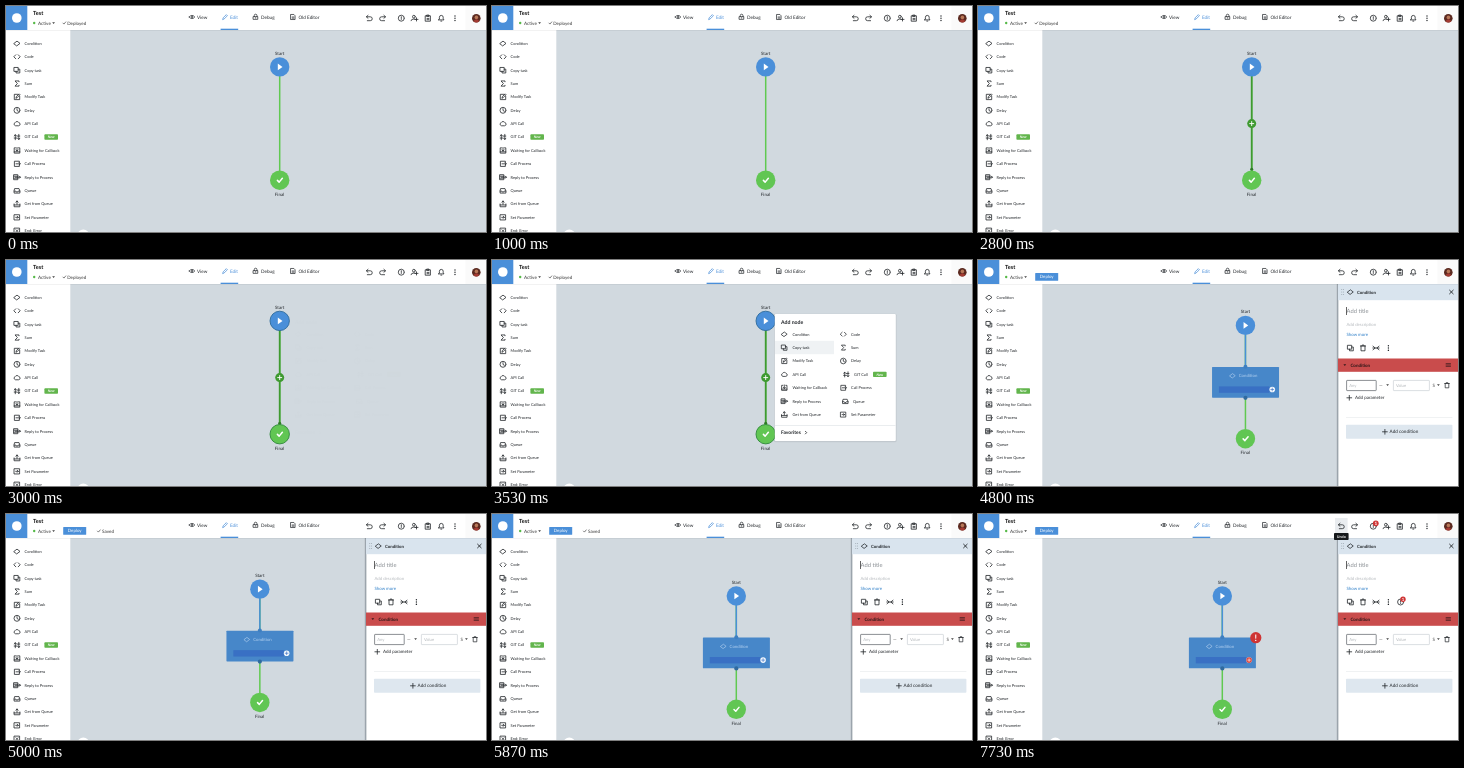
An HTML page for the animation above (8 s loop, 480 by 226 pixels).

```html
<!DOCTYPE html>
<html lang="en">
<head>
<meta charset="utf-8">
<title>Process editor</title>
<style>
html, body { margin: 0; width: 100%; height: 100%; overflow: hidden; background: #d1d9df; }
svg { display: block; width: 100vw; height: 100vh; }
text { font-family: Lato, "Open Sans", sans-serif; fill: #22262a; text-rendering: geometricPrecision; white-space: pre; }
.ic { fill: none; stroke: #22262a; stroke-width: .8; stroke-linejoin: round; stroke-linecap: round; }
</style>
</head>
<body>
<svg id="stage" viewBox="0 0 480 226" xmlns="http://www.w3.org/2000/svg"></svg>
<script>
const LOOP = 8000;
const BLUE = '#4a8fd9', GREEN = '#61c653', DARK = '#3f9a31', RED = '#cf3434';

// 8x8 line icons centred on 0,0
const ICONS = {
  diamond: 'M-3 0L0-2.3L3 0L0 2.3Z',
  code: 'M-1.2-2L-3.2 0L-1.2 2M1.2-2L3.2 0L1.2 2',
  copy: 'M-2.7-2.7H1.2V1.2H-2.7ZM1.2-1H2.8V2.8H-1V1.2',
  sum: 'M2-1.8V-2.6H-2L.4 0L-2 2.6H2V1.8',
  modify: 'M1-2.6H-2.7V2.7H2.7V-.6M-1 1L-.6-.4L2.2-3L3-2.2L.4.5Z',
  clock: 'M3 0A3 3 0 1 1-3 0A3 3 0 1 1 3 0M0-1.7V.2L1.4 1',
  cloud: 'M-1.8 2A1.6 1.6 0 0 1-1.9-1A2.2 2.2 0 0 1 2-.9A1.5 1.5 0 0 1 2 2Z',
  git: 'M-1.7 2.7V-2.2M-2.7-1.2L-1.7-2.4L-.7-1.2M-2.8 1H0M1.8-2.7V2.3M.8 1.2L1.8 2.5L2.8 1.2M0-1H2.8',
  wait: 'M-1.5-2.6H-2.8V2.7H2.8V-2.6H1.5M0-3V.6M-1.1-.5L0 .7L1.1-.5M-2.8 1.4H2.8',
  call: 'M2.4-1V-2.6H-2.6V2.6H2.4V1M-1 0H3.2M2.2-1L3.2 0L2.2 1',
  reply: 'M-3-2.5H.8V2.5H-3ZM-1.6 0H3.4M2.3-1.1L3.4 0L2.3 1.1M-3-1H.8M-3 1H.8',
  queue: 'M-2-2H2L2.9.5V2.5H-2.9V.5ZM-2.9.5H-1.2L-.8 1.4H.8L1.2.5H2.9',
  getq: 'M-2.9 0V2.8H2.9V0M-2.9 1H2.9M0 .4V-3M-1.2-1.8L0-3L1.2-1.8',
  param: 'M-2.6-2.6H2.6V2.6H-2.6ZM-1.3 0H1.3M.3-1L1.3 0L.3 1',
  end: 'M-2.6-2.6H2.6V2.6H-2.6ZM-1-1L1 1M1-1L-1 1',
  eye: 'M-3.1 0Q0-3.8 3.1 0Q0 3.8-3.1 0ZM.8 0A.8.8 0 1 1-.8 0A.8.8 0 1 1 .8 0',
  pencil: 'M-2.5 2.5L-2 .8L1.5-2.6L2.7-1.4L-.8 2Z',
  lock: 'M-2.4-.4H2.4V2.6H-2.4ZM-1.5-.4V-1.6A1.5 1.5 0 0 1 1.5-1.6V-.4M0 .7V1.3',
  page: 'M-2.3-2.8H1L2.3-1.4V2.8H-2.3ZM-1 0H1M-1 1.3H1',
  undo: 'M-1.3-2.9L-2.9-1.4L-1.3.1M-2.8-1.4H1A1.9 1.9 0 0 1 1 2.5H-2',
  redo: 'M1.3-2.9L2.9-1.4L1.3.1M2.8-1.4H-1A1.9 1.9 0 0 0-1 2.5H2',
  info: 'M3 0A3 3 0 1 1-3 0A3 3 0 1 1 3 0M0-1.5V.3M0 1.4V1.5',
  user: 'M1-1.5A1.4 1.4 0 1 1-1.8-1.5A1.4 1.4 0 1 1 1-1.5M-3.3 2.5Q-3.2.8-.4.8Q1 .8 1.2 1.3M2.2-.4V2.8M.7 1.2H3.7',
  board: 'M-2.4-2.4H2.4V3H-2.4ZM-1-3.1H1V-1.8H-1ZM-1 .2H1M-1 1.5H1',
  bell: 'M-2.7 1.7H2.7L1.9.6V-.9A1.9 1.9 0 0 0-1.9-.9V.6ZM-.5 2.9H.5',
  dots: 'M0-2.3V-2.2M0 0V.1M0 2.3V2.4',
  trash: 'M-2.6-2H2.6M-1-2V-2.9H1V-2M-2-2V2.8H2V-2',
  split: 'M-3-1.8L-.8 0L-3 1.8M3-1.8L.8 0L3 1.8M-3.2 0H3.2',
  close: 'M-1.8-1.8L1.8 1.8M1.8-1.8L-1.8 1.8',
  plus: 'M-2.4 0H2.4M0-2.4V2.4',
  check: 'M-1.5.1L-.4 1.2L1.6-1.2',
  menu: 'M-2.2-1.4H2.2M-2.2 0H2.2M-2.2 1.4H2.2'
};

const icon = (name, x, y, color = '#22262a', scale = 1, w = .8) =>
  `<path class="ic" d="${ICONS[name]}" transform="translate(${x} ${y}) scale(${scale})" style="stroke:${color};stroke-width:${w}"/>`;
const label = (s, x, y, size, color = '#22262a', extra = '') =>
  `<text x="${x}" y="${y + size * .35}" font-size="${size}" style="fill:${color}" ${extra}>${s}</text>`;
const rect = (x, y, w, h, fill, extra = '') =>
  `<rect x="${x}" y="${y}" width="${w}" height="${h}" fill="${fill}" ${extra}/>`;
const circle = (x, y, r, fill, extra = '') =>
  `<circle cx="${x}" cy="${y}" r="${r}" fill="${fill}" ${extra}/>`;
const line = (y1, y2, color, w, id) =>
  `<path id="${id}" d="M273.7 ${y1}V${y2}" stroke="${color}" stroke-width="${w}" fill="none"/>`;
const caret = (x, y, color = '#444') =>
  `<path d="M${x - 1.4} ${y - .7}h2.8l-1.4 1.6z" fill="${color}"/>`;
const group = (id, body, extra = '') => `<g id="${id}" ${extra}>${body}</g>`;
const bold = 'font-weight="700"', mid = 'text-anchor="middle"';
const newBadge = (x, y) => rect(x, y - 2.7, 13.6, 5.4, '#62b54c', 'rx=".8"') +
  label('New', x + 6.8, y, 3.5, '#fff', mid + ' font-style="italic" font-weight="700"');
const alertDot = (x, y, r, s) => circle(x, y, r, RED) + label(s, x, y, r * 1.6, '#fff', mid + ' ' + bold);

const TASKS = [['diamond', 'Condition'], ['code', 'Code'], ['copy', 'Copy task'], ['sum', 'Sum'],
  ['modify', 'Modify Task'], ['clock', 'Delay'], ['cloud', 'API Call'], ['git', 'GIT Call'],
  ['wait', 'Waiting for Callback'], ['call', 'Call Process'], ['reply', 'Reply to Process'],
  ['queue', 'Queue'], ['getq', 'Get from Queue'], ['param', 'Set Parameter'], ['end', 'End: Error']];

function sidebar() {
  return rect(0, 24, 64.3, 202, '#fff') + TASKS.map(([ic, name], i) => {
    const y = 37.4 + i * 13.38;
    return icon(ic, 11, y) + label(name, 18.6, y, 3.95) + (name === 'GIT Call' ? newBadge(38.4, y) : '');
  }).join('');
}

function header() {
  const tabs = [['eye', 186, 'View', 191], ['pencil', 219, 'Edit', 224], ['lock', 249.6, 'Debug', 255], ['page', 287, 'Old Editor', 292.5]];
  const tools = [['undo', 363.3], ['redo', 376.6], ['info', 395.3], ['user', 408.3], ['board', 422], ['bell', 435.3], ['dots', 449]];
  return rect(0, 24, 480, .7, '#000', 'opacity=".08"') + rect(0, 0, 480, 24, '#fff') +
    rect(0, 0, 21.3, 24, BLUE) + circle(10.8, 12, 4.8, '#fff') +
    label('Test', 27, 7.5, 5.6, '#111', bold) +
    circle(28.2, 17, 1.2, '#55b947') + label('Active', 32, 17, 4.6, '#333') + caret(47.6, 17) +
    group('deployed', icon('check', 58.3, 17, '#333', .9, .7) + label('Deployed', 61.2, 17, 4.5, '#333')) +
    group('deploy', rect(57.2, 13, 23, 7.8, BLUE, 'rx=".6"') + label('Deploy', 68.7, 16.9, 4.4, '#fff', mid)) +
    group('saved', icon('check', 92.8, 17, '#333', .9, .7) + label('Saved', 96, 17, 4.6, '#333')) +
    tabs.map(([ic, ix, s, x]) => {
      const c = s === 'Edit' ? BLUE : '#22262a';
      return icon(ic, ix, 11, c, .9) + label(s, x, 11.2, 4.65, c);
    }).join('') +
    rect(214.6, 22.7, 17.6, 1.3, BLUE) +
    rect(357, 4, 12.6, 15, '#e9ecef', 'id="undoBg"') +
    tools.map(([ic, x]) => icon(ic, x, 12.2, '#22262a', 1, ic === 'dots' ? 1.4 : .8)).join('') +
    rect(459.5, 0, 20.5, 24, '#fafafa') +
    circle(470.3, 12.2, 4.3, '#5b2a20') + circle(470.4, 11.4, 1.8, '#b87858') +
    '<path d="M467.4 15.3q3-4 6 0q-3 2.400-6 0z" fill="#a33a32"/>' +
    group('headBadge', alertDot(397.8, 9.3, 2.9, '1'));
}

function disc(y, fill, id, mark) {
  return circle(273.7, y, 9.7, fill, `id="${id}" stroke-width=".9"`) + mark;
}

function scene() {
  const node = rect(240.3, 102.4, 67, 30.8, '#4787c9', 'rx=".6"') +
    icon('diamond', 260.8, 111.2, '#b4d1f0', .9, .7) + label('Condition', 267, 111.2, 4.3, '#b4d1f0') +
    rect(247.2, 121.9, 50.5, 6.4, '#3970c4') +
    circle(300.5, 125, 2.8, '#f4f8fd', 'id="port"') + icon('plus', 300.5, 125, '#3970c4', .6, 1.1);
  return line(70, 165, '#60c951', 1.5, 'lower') + line(70, 102, BLUE, 1.5, 'upper') +
    group('hover', line(70, 165, DARK, 1.7, 'hoverLine') + circle(273.7, 163.2, 1.5, '#2f7a26') +
      circle(273.7, 117.6, 4.5, DARK) + icon('plus', 273.7, 117.6, '#fff', .85, 1.1)) +
    disc(60.9, BLUE, 'startDisc', '<path d="M271.800 57.600v6.600l4.700-3.300z" fill="#fff"/>') +
    disc(174.2, GREEN, 'endDisc', icon('check', 273.8, 174.2, '#fff', 1.6, .95)) +
    label('Start', 273.7, 47.4, 4.45, '#22262a', mid) +
    label('Final', 273.5, 188, 4.45, '#22262a', mid) +
    group('node', node) +
    group('ports', circle(273.7, 102.2, 2, '#3f7fc0') + circle(273.7, 133.3, 2.1, '#316a9e')) +
    group('newPort', circle(273.7, 133.3, 2.6, '#4787c9') + circle(273.7, 133.3, 1.7, '#eef5fc')) +
    group('alert', circle(300.5, 125, 2.8, '#dc4840') + icon('plus', 300.5, 125, '#fff', .55, 1.1) +
      alertDot(307.2, 102.6, 5.6, '!'));
}

function popup() {
  const offset = { 'GIT Call': 3, Queue: 2 };
  const rows = TASKS.slice(0, 14).map(([ic, name], i) => {
    const right = i % 2, y = 74.2 + (i >> 1) * 13.4, dx = offset[name] || 0;
    return icon(ic, (right ? 351.3 : 292.3) + dx, y, '#22262a', .95) +
      label(name, right ? 359 + dx : 300.5, y, 3.95) + (name === 'GIT Call' ? newBadge(381, y) : '');
  }).join('');
  return rect(282, 53.8, 122.6, 128.4, '#000', 'opacity=".08" rx="1.5"') +
    rect(282.8, 54, 121, 127, '#fff', 'rx="1"') +
    label('Add node', 289, 62.4, 5.2, '#22262a', bold) +
    rect(283, 0, 59, 13.4, '#eff2f4', 'id="rowBg"') + rows +
    rect(283, 165, 120.6, .6, '#dde1e5') +
    label('Favorites', 289, 172.6, 4.9, '#22262a', bold) +
    '<path class="ic" d="M313.400 171.300l1.300 1.300l-1.300 1.300"/>';
}

function panel() {
  const field = (x, w, c, s) => rect(x, 120.4, w, 10.2, '#fff', `stroke="${c}" stroke-width=".7" rx=".5"`) +
    label(s, x + 2.6, 125.4, 4.2, '#b4b8bc');
  const grips = [29.5, 32, 34.5].map(y => circle(363.8, y, .45, '#7c8790') + circle(365.5, y, .45, '#7c8790')).join('');
  return rect(358.6, 24, 1.4, 202, '#000', 'opacity=".12"') + rect(360, 24, 120, 202, '#fff') +
    rect(359.5, 24, .8, 202, '#7f8a93') + rect(360, 24, 120, 16.2, '#d9e4ee') + grips +
    icon('diamond', 372.4, 32, '#22262a', .95) + label('Condition', 379, 32, 4.3, '#22262a', bold) +
    icon('close', 473.4, 32, '#22262a', 1, .9) +
    label('Add title', 368.6, 50.6, 5.8, '#8a8f94') + rect(368.2, 47, .7, 8, '#222', 'id="cursor"') +
    label('Add description', 368.4, 64.5, 4.3, '#b6babe') +
    label('Show more', 368.4, 74, 4.4, '#2f7fc8') +
    icon('copy', 372.5, 88) + icon('trash', 385, 88) + icon('split', 398, 88) + icon('dots', 410.4, 88, '#22262a', 1, 1.4) +
    group('panelBadge', icon('info', 422.6, 88) + alertDot(425, 85.3, 2.7, '1')) +
    rect(360, 98.5, 120, 13.3, '#c94c4c') + caret(366.8, 105, '#33191a') +
    label('Condition', 372.4, 105, 4.5, '#2b1718', bold) + icon('menu', 470.3, 105, '#4a2022', 1, .8) +
    field(368.6, 29.6, '#5b6066', 'Any') + label('—', 401, 125.2, 4.6, '#444') + caret(409.6, 125) +
    field(415.4, 36, '#ccd1d6', 'Value') + label('S', 454.4, 125.2, 4.5, '#444') + caret(460.4, 125) +
    icon('trash', 469, 125.3, '#22262a', .9) +
    icon('plus', 371.3, 137.8, '#22262a', 1, .8) + label('Add parameter', 377, 137.8, 4.5) +
    rect(368, 157, 106.4, .6, '#e6e9ec') + rect(368, 164.8, 106.4, 14, '#dee7ef', 'rx=".8"') +
    icon('plus', 406.9, 171.8, '#22262a', 1, .8) + label('Add condition', 411.6, 171.8, 4.65);
}

const stage = document.getElementById('stage');
stage.innerHTML = rect(0, 0, 480, 226, '#d1d9df') + group('scene', scene()) + group('popup', popup()) +
  circle(77.3, 229.4, 6, '#fff') + sidebar() + group('panel', panel()) + header() +
  group('tip', rect(356, 18.9, 14.6, 7.2, '#15181b', 'rx=".8"') + label('Undo', 363.3, 22.4, 3.7, '#fff', mid + ' ' + bold));

const el = {};
stage.querySelectorAll('[id]').forEach(n => { el[n.id] = n; });

const ramp = (t, from, dur) => Math.min(1, Math.max(0, (t - from) / dur));
const easeOut = p => 1 - (1 - p) ** 2;
const fade = (id, v) => { el[id].style.opacity = v; };
const show = (id, on) => { el[id].style.display = on ? '' : 'none'; };

function render(t) {
  const hover = t >= 2800 && t < 4000;
  const menu = t < 4000 ? ramp(t, 3000, 200) : 1 - ramp(t, 4000, 130);
  const edited = t >= 4270;
  const failed = t >= 6530;

  show('hover', hover);
  fade('popup', menu);
  show('popup', menu > 0);
  const row = t >= 3730 ? 0 : t >= 3530 ? 1 : t >= 3400 ? 2 : 3;
  el.rowBg.setAttribute('y', 67.4 + row * 13.4);
  show('rowBg', t >= 3330);
  const ringed = hover && menu > 0;
  el.startDisc.setAttribute('stroke', ringed ? '#2e6b9c' : 'none');
  el.endDisc.setAttribute('stroke', ringed ? '#2f8a3a' : 'none');

  show('deployed', !edited);
  show('deploy', edited);
  show('saved', t >= 4870 && t < 6470);

  const pan = easeOut(ramp(t, 4730, 630));
  el.scene.setAttribute('transform', `translate(${-29.4 * pan} ${21.1 * pan})`);
  fade('node', .72 * ramp(t, 4270, 130) + .28 * ramp(t, 4500, 200));
  const settled = t >= 4600;
  show('upper', settled);
  show('ports', settled);
  show('newPort', t >= 4330 && !settled);

  const slide = easeOut(ramp(t, 4530, 230));
  el.panel.setAttribute('transform', `translate(${122 * (1 - slide)} 0)`);
  show('panel', slide > 0);
  show('cursor', Math.floor((t - 4730) / 500) % 2 === 0);

  ['alert', 'headBadge', 'panelBadge'].forEach(id => show(id, failed));
  show('undoBg', t >= 6730);
  fade('tip', ramp(t, 7000, 200));
}

function tick() {
  render(performance.now() % LOOP);
  requestAnimationFrame(tick);
}
tick();
</script>
</body>
</html>
```
